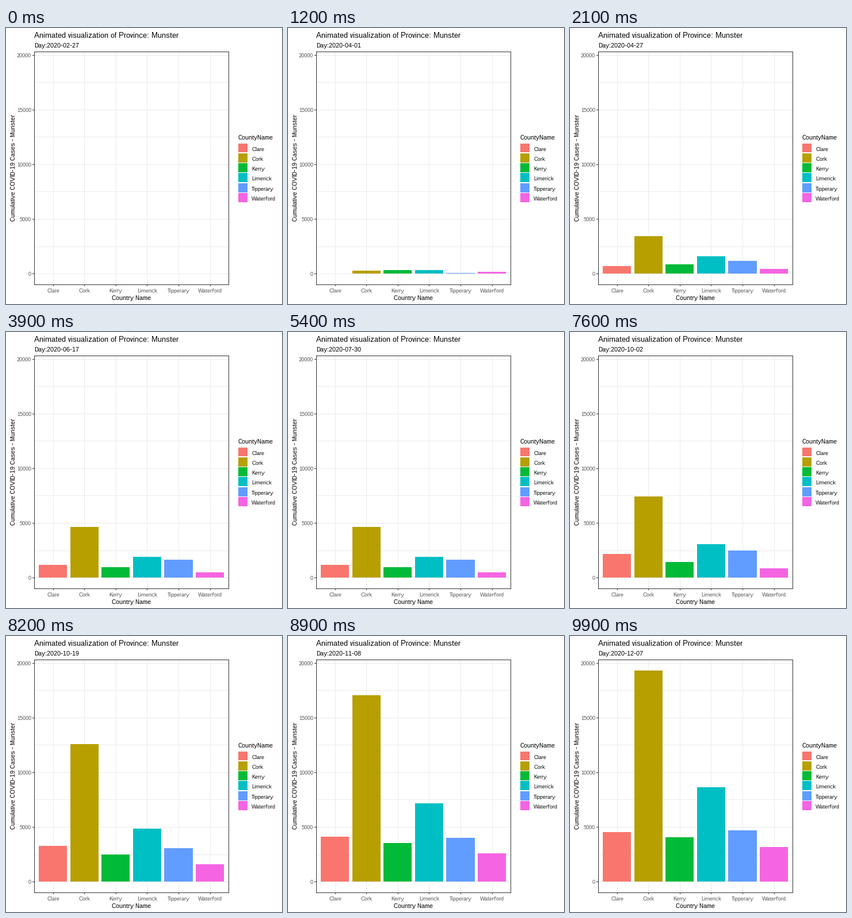
Recreate the animation shown at these times as a matplotlib script. Size 480x480 px, loop 10 s.

```python
import numpy as np
import matplotlib.pyplot as plt
from matplotlib.animation import FuncAnimation
from matplotlib.patches import Rectangle

plt.rcParams.update({"font.family": "Liberation Sans",
                     "text.hinting": "native", "text.hinting_factor": 1})

SIZE, FRAMES, DAYS = 480, 100, 284
START = np.datetime64("2020-02-27")
LEFT, RIGHT, TOP, BOTTOM = 49, 387, 41, 446
GRID, DARK, TICK_TEXT = "#EBEBEB", "#333333", "#4D4D4D"

# color, spring size and time, summer size, autumn size and time
COUNTIES = {
    "Clare": ("#F8766D", 1170, 18.5, 460, 3026, 79.0),
    "Cork": ("#B79F00", 4650, 16.2, 520, 14725, 79.7),
    "Kerry": ("#00BA38", 945, 12.0, 110, 3157, 80.5),
    "Limerick": ("#00BFC4", 1910, 14.1, 930, 6193, 82.7),
    "Tipperary": ("#619CFF", 1645, 16.6, 830, 2414, 84.0),
    "Waterford": ("#F564E3", 487, 11.6, 220, 2624, 82.4),
}


def wave(t, size, mid, width):
    """Gompertz curve: a fast outbreak that levels off."""
    return size * np.exp(-np.exp((mid - t) / width))


def cases(t, spring, spring_mid, summer, autumn, autumn_mid):
    return (wave(t, spring, spring_mid, 4) + wave(t, summer, 64, 4)
            + wave(t, autumn, autumn_mid, 6))


fig = plt.figure(figsize=(4.8, 4.8), dpi=100, facecolor="white")
ax = fig.add_axes([0, 0, 1, 1])
ax.set_xlim(0, SIZE)
ax.set_ylim(SIZE, 0)
ax.axis("off")


def box(x0, y0, x1, y1, color, z=1):
    return ax.add_patch(Rectangle((x0, y0), x1 - x0, y1 - y0,
                                  facecolor=color, linewidth=0, zorder=z))


def label(x, y, text, px, color="black", ha="left", rotation=0):
    return ax.text(x, y, text, fontsize=px * 0.72, color=color, ha=ha,
                   va="baseline", rotation=rotation, rotation_mode="anchor")


# Horizontal grid and y axis
for k in range(9):
    y = round(427.02 - 47.51 * k)
    box(LEFT, y, RIGHT, y + 1, GRID)
    if k % 2 == 0:
        box(LEFT - 3, y, LEFT, y + 1, DARK)
        label(44, y + 4, str(2500 * k), 9, TICK_TEXT, ha="right")

# Vertical grid, x axis, bars and legend
bars = {}
for k, (name, (color, *_)) in enumerate(COUNTIES.items()):
    mid = 81.93 + 54.515 * k
    x = round(mid)
    box(x, TOP, x + 1, BOTTOM, GRID)
    box(x, BOTTOM + 1, x + 1, BOTTOM + 3, DARK)
    label(mid + 0.3, 460, name, 9, TICK_TEXT, ha="center")
    bars[name] = box(round(mid - 24.5), 427, round(mid + 24.53), 427, color, 2)

    y = 201.1 + 17.28 * k
    box(404, int(y), 420, int(y + 15.8), color)
    label(427, int(y) + 13, name, 9)

# Panel border
for edge in ((LEFT, TOP, RIGHT + 1, TOP + 1), (LEFT, BOTTOM, RIGHT + 1, BOTTOM + 1),
             (LEFT, TOP, LEFT + 1, BOTTOM + 1), (RIGHT, TOP, RIGHT + 1, BOTTOM + 1)):
    box(*edge, DARK, 3)

label(49, 17, "Animated visualization of Province: Munster", 13)
day_label = label(49, 34, "", 11)
label(218, 473, "Country Name", 11, ha="center")
label(16, 243.5, "Cumulative COVID-19 Cases - Munster", 11, ha="center", rotation=90)
label(404, 194, "CountyName", 11)


def update(frame):
    day_label.set_text(f"Day:{START + frame * DAYS // (FRAMES - 1)}")
    for name, bar in bars.items():
        top = min(427, round(427.4 - 0.019 * cases(frame, *COUNTIES[name][1:])))
        bar.set_y(top)
        bar.set_height(427 - top)
    return [day_label, *bars.values()]


anim = FuncAnimation(fig, update, frames=FRAMES, interval=100,
                     repeat=True, repeat_delay=0, blit=False)
plt.show()
```
